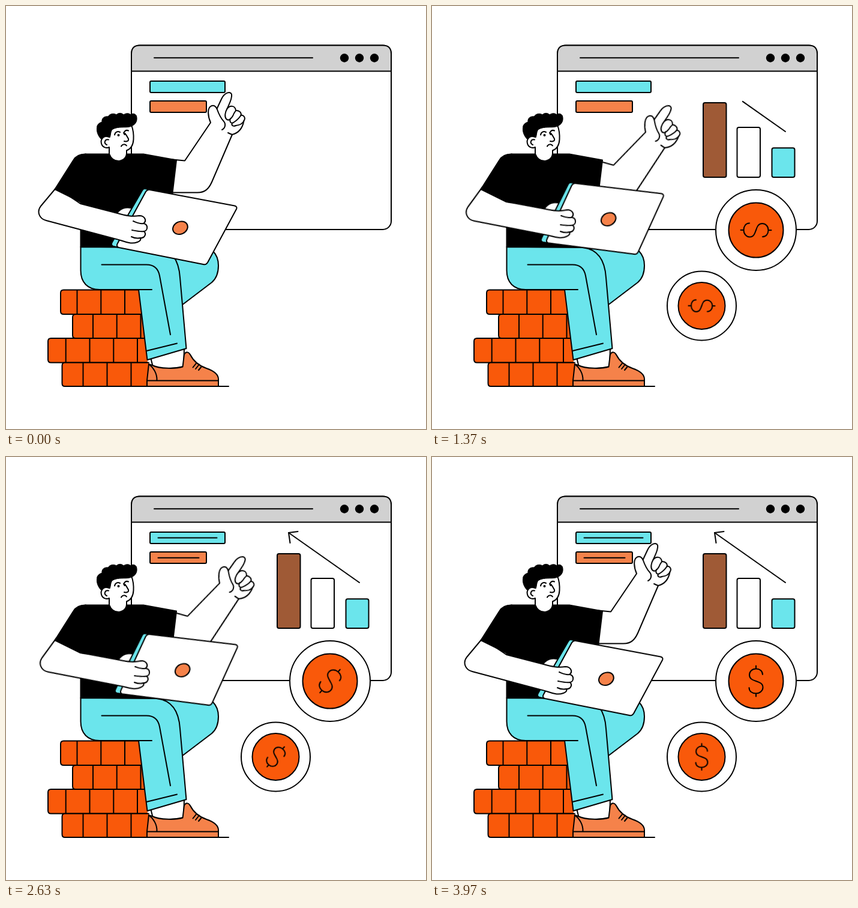
An HTML page for the animation above (4.01 s loop, 700 by 704 pixels).

```html
<!DOCTYPE html>
<html lang="en">
<head>
<meta charset="utf-8">
<title>Presenting a chart</title>
<style>
html, body { margin: 0; width: 100%; height: 100%; overflow: hidden; background: #fff; }
svg { display: block; width: 100%; height: 100%; }
svg * { vector-effect: none; }
.ink { fill: none; stroke: #000; stroke-width: 2; stroke-linecap: round; stroke-linejoin: round; }
.white { fill: #fff; }
.black { fill: #000; }
.grey { fill: #d1d1d1; }
.cyan { fill: #6be5ec; }
.orange { fill: #f5824a; }
.brick { fill: #f9590a; }
.brown { fill: #9f5a36; }
.none { fill: none; }

/* Every track shares one loop; eased segments inside it. */
.track {
  animation: 4010ms cubic-bezier(.333, 0, .667, 1) infinite both;
}
.point { transform-origin: 258px 287px; animation-name: point; }
.hold { transform-origin: 80px 306px; animation-name: hold; }
.big { transform-origin: 540px 373px; animation-name: coin; }
.small { transform-origin: 449.5px 499px; animation-name: coin; }
.spin { animation-name: spin; animation-timing-function: linear; }
.bar1 { transform-origin: 585.5px 286px; animation-name: bar1; }
.bar2 { transform-origin: 527.8px 286px; animation-name: bar2; }
.bar3 { transform-origin: 471.2px 286px; animation-name: bar3; }
.shaft { stroke-dasharray: 1 2; animation-name: shaft; }
.tip { transform-origin: 471px 126px; animation-name: tip; }
.text1 { transform-origin: 253px 131.5px; animation-name: text1; }
.text2 { transform-origin: 253px 165px; animation-name: text2; }

@keyframes point {
  0%, 49.88%, 99.75%, 100% { transform: rotate(0); }
  24.94%, 74.81% { transform: rotate(14.6deg); }
}
@keyframes hold {
  0%, 49.88%, 99.75%, 100% { transform: rotate(0); }
  24.94%, 74.81% { transform: rotate(-5.6deg); }
}
@keyframes spin {
  0%, 12.47% { transform: rotate(0); }
  99%, 100% { transform: rotate(360deg); }
}
@keyframes coin { 0% { transform: scale(0); } 12.47%, 100% { transform: none; } }
@keyframes bar1 { 0%, 14.96% { transform: scale(0); } 22.44%, 100% { transform: none; } }
@keyframes bar2 { 0%, 19.95% { transform: scale(0); } 27.43%, 100% { transform: none; } }
@keyframes bar3 { 0%, 24.94% { transform: scale(0); } 32.42%, 100% { transform: none; } }
@keyframes shaft {
  0%, 29.92% { stroke-dashoffset: 1; visibility: hidden; }
  29.93% { stroke-dashoffset: 1; visibility: visible; }
  37.41%, 100% { stroke-dashoffset: 0; visibility: visible; }
}
@keyframes tip { 0%, 37.41% { transform: scale(0); } 42.39%, 100% { transform: none; } }
@keyframes text1 { 0%, 41.4% { transform: scale(0); } 49.13%, 100% { transform: none; } }
@keyframes text2 { 0%, 46.38% { transform: scale(0); } 53.87%, 100% { transform: none; } }
</style>
</head>
<body>
<svg viewBox="0 0 700 704" preserveAspectRatio="none">
  <defs>
    <path id="dollar" d="M11 -11C11 -17 6 -20.5 0 -20.5C-6.5 -20.5 -11 -16 -11 -10.5C-11 -4 -6 -2 0 0C6 2 11.5 4 11.5 10.5C11.5 16 6.5 20.5 0 20.5C-6.5 20.5 -11.5 17 -11.5 11M0 -25.5V-20.5M0 20.5V25.5"/>
  </defs>

  <!-- browser window -->
  <g class="ink">
    <rect class="white" x="209" y="65.5" width="433" height="306.5" rx="14"/>
    <path class="grey" d="M209 108.5V79.500Q209 65.500 223 65.500H628Q642 65.500 642 79.500V108.500Z"/>
    <path d="M247 86.300H511"/>
    <g class="black" stroke="none">
      <circle cx="564" cy="86.500" r="7.200"/>
      <circle cx="589" cy="86.500" r="7.200"/>
      <circle cx="614" cy="86.500" r="7.200"/>
    </g>
    <rect class="cyan" x="240" y="125" width="125" height="19" rx="2"/>
    <rect class="orange" x="240" y="158" width="94" height="19" rx="2"/>
    <path class="track text1" d="M253.500 134.500H351.500"/>
    <path class="track text2" d="M253.500 167.700H321.500"/>
  </g>

  <!-- chart -->
  <g class="ink" stroke-width="2.200">
    <rect class="brown track bar3" x="452" y="161" width="38.500" height="124" rx="3"/>
    <rect class="white track bar2" x="508.500" y="202" width="38.500" height="83" rx="3"/>
    <rect class="cyan track bar1" x="566.500" y="236.300" width="38" height="48.700" rx="3"/>
    <path class="track shaft" pathLength="1" d="M589 209L471 126"/>
    <path class="track tip" d="M473.500 143L471 126L486.500 124"/>
  </g>

  <!-- coins -->
  <g class="ink track big">
    <circle class="white" cx="540" cy="373" r="67"/>
    <circle class="brick" cx="540" cy="373" r="45.500"/>
    <g transform="translate(540 373)"><use class="track spin" href="#dollar"/></g>
  </g>
  <g class="ink track small">
    <circle class="white" cx="449.500" cy="499" r="57.500"/>
    <circle class="brick" cx="449.500" cy="499" r="39"/>
    <g transform="translate(449.500 499) scale(.86)" stroke-width="2.300"><use class="track spin" href="#dollar"/></g>
  </g>

  <!-- brick pile and ground -->
  <g class="ink">
    <path d="M101 633H371"/>
    <g class="brick">
      <path d="M224 472.500H96Q91 472.500 91 477.500V508Q91 513 96 513H228"/>
      <path d="M230 513H116Q111 513 111 518V548Q111 553 116 553H233"/>
      <path d="M234 553H75Q70 553 70 558V588.500Q70 593.500 75 593.500H236"/>
      <path d="M238 593.500H98Q93.500 593.500 93.500 598.500V628Q93.500 633 98 633H238"/>
    </g>
    <path d="M118.500 473V513M158.300 473V513M198 473V513M145 513V553M184.700 513V553M224.500 513V553M99.700 553V593M139.500 553V593M179.300 553V593M219 553V593M128.500 594V633M168.500 594V633M208.500 594V633"/>
  </g>

  <!-- legs and shoe -->
  <g class="ink">
    <path class="cyan" d="M255 403L345 408C351 414 354 422 354 432C354 444 350 454 343 460L285 504Z"/>
    <path class="white" d="M241 585L245 601Q270 606 296 600L297 570Z"/>
    <path class="orange" d="M238 596L244 598C256 604 284 604 294.500 600.500L297 580C300 574 305 576 307.500 581C312 590 320 598 334 603C347 607.500 354 613 354 621V633H235V623Z"/>
    <path d="M235 623.500H354M238 596C246 602 252 612 251.500 623M311.500 601.500L317.500 594M316 604L322 596.500M321 606L326 600"/>
    <path class="cyan" d="M124.500 401V440C124.500 460 136 472 156 472H221L235.500 589L300.500 570L290 452C288 421 275 405 252 402Z"/>
    <path d="M159.500 430.500H234C247 430.500 254 438 256 449L274 547M156 472H243M234 574L285 561.500"/>
  </g>

  <!-- pointing arm -->
  <g class="ink track point">
    <path class="white" d="M262 254L298 257.500L341 194C337 185 334 169 343 166C348 164.500 350 168 351.500 171L359 155C364 144 374 141 376 147C377.500 154 371 165 368.500 171C373 165 382 165 383 174C388 173.500 393 177 391.500 182C396 181 400 186 396.500 191C394.500 202 389 211 377 214L343 293C338 304 332 310.500 319 310.500H262Z"/>
    <path d="M351.500 171C354 178 357 186 363 192C367 197 365 204 360 206M368.500 171C365 177 364 184 367 188C371 192 375 188 378 183Q380 178 383 174M374 187C372 193 375 196 379 194Q387 189 391.500 182M377 195C375 199 379 201 383 199C391 198 395 195 396.500 191M370 211Q374 213 377 214"/>
  </g>

  <!-- torso -->
  <path class="ink black" d="M132 246.500H229L284 256.500L277.500 311L262 401H124.500V300Z"/>

  <!-- head -->
  <g class="ink">
    <path class="white" d="M172 233V246C175 254 181 258 188 258C196 257 201 252 201 245V238Z" stroke="none"/>
    <path class="white" d="M172 218C163 214 157 222 159 229C161 236 168 237 172 235V246C175 254 181 258 188 258C196 257 201 252 201 245V240.500C208 238 212 231 212.500 222C213 213 212 206 209 198L175 200Z"/>
    <path class="black" stroke-width="1" d="M152 200Q153 195 160 193C159 187 164 183 170 184C173 179 180 178 184 181C188 177 193 178 196 181C200 178 205 178 208 181C210 178 216 179 217.500 183C220 192 215 199 206 201C198 203 188 200 178 205C174 208 175 214 173 219C166 216 161 218 159 222C153 216 150 208 152 200Z"/>
    <path d="M171 222.500C165 221 162 228 168 231M181 214.500C182 209.500 186 208 190 210M196 211.500C198 207.500 201 206 204 207.500M200 214L204 221C205 225 201 226 197 225M192 233.500C194 229.500 199 229.500 201 232.500"/>
    <g class="black" stroke="none">
      <circle cx="187.500" cy="215" r="2"/>
      <circle cx="198" cy="213" r="2"/>
    </g>
  </g>

  <!-- laptop and holding arm -->
  <g class="ink track hold">
    <path class="white" d="M184 346C190 337 200 333 212 337L204 352Z"/>
    <path class="cyan" d="M227 307Q229 303 234 304.500L241 306L188 402L179 400Q174 398 177 393Z"/>
    <path class="white" d="M240 306L381 332.500Q386 334 384 338L336 427Q333.500 431 329 430L188 402Q183 400 186 395L233 309Q236 305 240 306Z"/>
    <ellipse class="orange" cx="290.400" cy="369.200" rx="12.800" ry="10.300" transform="rotate(-25 290.400 369.200)"/>
    <path class="white" d="M84 302L124 329L186 345C200 349 210 351 222 349C232 349 235 358 229 362C237 363 237 374 230 375C235 380 230 387 224 386C227 392 214 396 205 394C195 392 190 389 180 387L67 357C55 354 51 342 58 333Z"/>
    <path d="M229 362C223 363 217 360 212 358M230 375C223 376 215 374 210 373M224 386C219 387 213 386 209 384"/>
  </g>

  <!-- near sleeve -->
  <path class="ink black" d="M132 246.500C122 246.500 116 250 112 257L81.500 305L124 326L140 328L150 250Z"/>
</svg>
</body>
</html>
```
